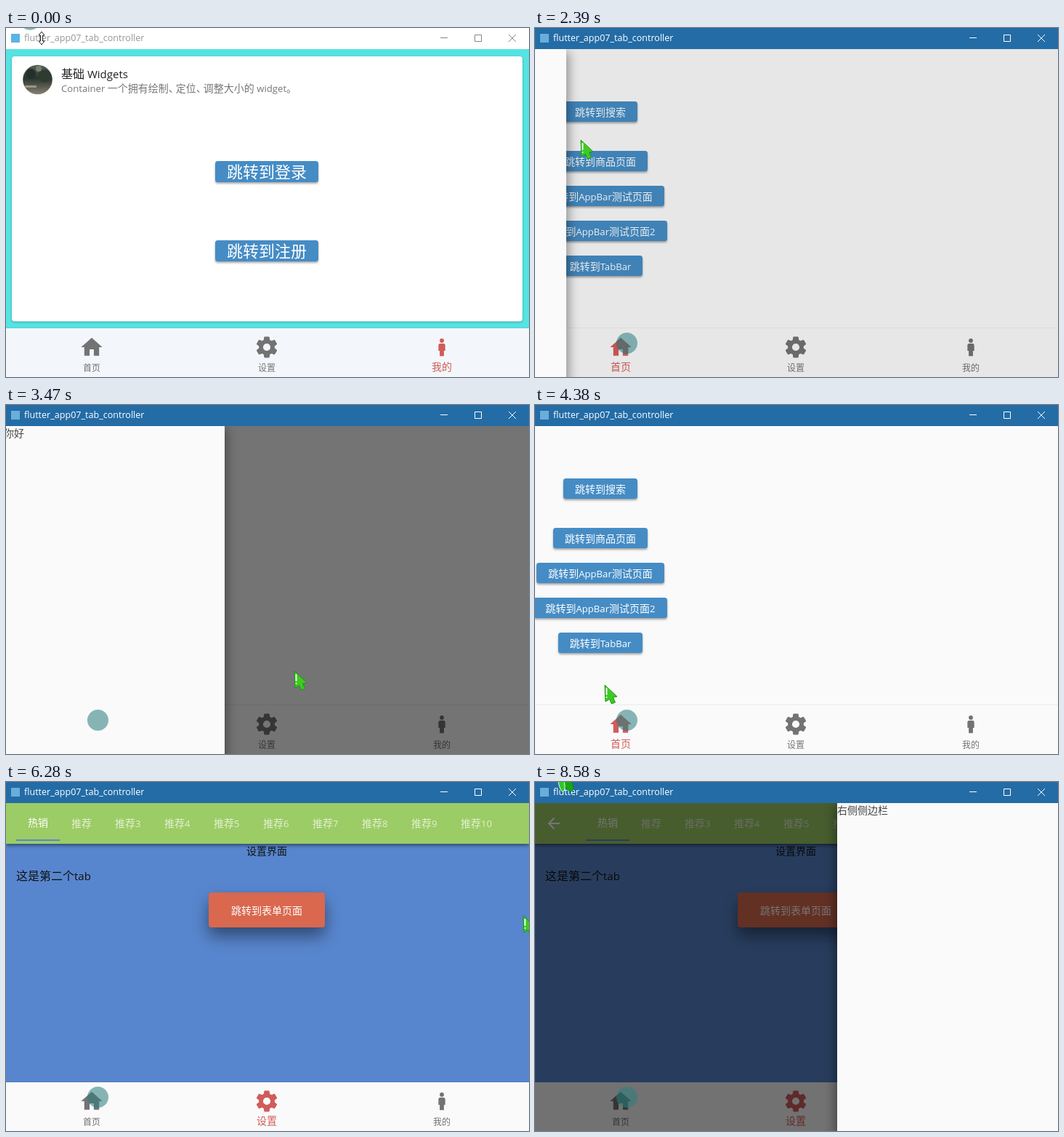
Recreate the animation shown at these times as an HTML page with a canvas. Size 720x480 px, loop 8.75 s.

```html
<!DOCTYPE html>
<html lang="zh">
<head>
<meta charset="utf-8">
<title>flutter_app07_tab_controller</title>
<style>
html, body { margin: 0; width: 100%; height: 100%; overflow: hidden; }
canvas { display: block; width: 720px; height: 480px; }
</style>
</head>
<body>
<canvas id="stage" width="720" height="480"></canvas>
<script>
const ctx = document.getElementById('stage').getContext('2d');
const LOOP = 8750;
const RED = [208, 92, 90], GREY = [115, 115, 115];

// The screen only refreshes at these moments.
const STEPS = [0, 220, 410, 600, 780, 960, 1160, 1320, 1490, 1660, 1830, 2390, 2560, 2730, 2900,
  3090, 3280, 3470, 3640, 3810, 4000, 4190, 4380, 4570, 4740, 4910, 5080, 5260, 5430, 5600,
  5770, 5940, 6110, 6280, 6640, 6830, 7000, 7360, 7890, 8070, 8240, 8410, 8580];
const POINTER = [[0, 49, 14], [220, 62, 90], [600, 118, 360], [780, 122, 428], [960, 119, 384],
  [1160, 100, 330], [1830, 3, 158], [2390, 63, 154], [3280, 400, 340], [3470, 397, 366],
  [4380, 96, 385], [4570, 110, 400], [5260, 362, 426], [5600, 362, 426], [6280, 712, 184],
  [6640, 628, 186], [6830, 414, 183], [7000, 398, 177], [7360, 220, 130], [7890, 150, 90], [8580, 30, -12]];
const LEFT = [[1830, 0], [2390, 43], [3090, 304], [3280, 304], [3470, 301], [4380, 0]];
const RIGHT = [[6280, 0], [6640, 80], [6830, 294], [7000, 304]];

const rgb = c => `rgb(${c.map(Math.round).join(',')})`;
const mix = (a, b, k) => a.map((v, i) => v + (b[i] - v) * k);

function valueAt(keys, t) {
  if (t <= keys[0][0]) return keys[0].slice(1);
  for (let i = 1; i < keys.length; i++) {
    const a = keys[i - 1], b = keys[i];
    if (t <= b[0]) return mix(a.slice(1), b.slice(1), (t - a[0]) / (b[0] - a[0]));
  }
  return keys[keys.length - 1].slice(1);
}

function box(x, y, w, h, color, r = 0) {
  ctx.fillStyle = color;
  ctx.beginPath();
  ctx.roundRect(x, y, w, h, r);
  ctx.fill();
}

function disc(x, y, r, color) {
  ctx.fillStyle = color;
  ctx.beginPath();
  ctx.arc(x, y, r, 0, 7);
  ctx.fill();
}

function withShadow(alpha, blur, dx, dy, draw) {
  ctx.save();
  ctx.shadowColor = `rgba(0,0,0,${alpha})`;
  ctx.shadowBlur = blur;
  ctx.shadowOffsetX = dx;
  ctx.shadowOffsetY = dy;
  draw();
  ctx.restore();
}

// Latin runs are set slightly smaller than the Chinese ones; y is the middle of the line.
function text(str, x, y, size, color, align = 'left') {
  const runs = str.match(/[\x20-\x7e]+|、|[^\x20-\x7e、]+/g).map(s => {
    const latin = /^[\x20-\x7e]/.test(s);
    const font = latin ? `${size * 0.938}px "Open Sans", "Noto Sans", sans-serif`
      : `${size}px "Noto Sans CJK SC", "Noto Sans CJK", sans-serif`;
    ctx.font = font;
    return { s, font, w: ctx.measureText(s).width * (s === '、' ? 0.72 : 1) };
  });
  if (align === 'center') x -= runs.reduce((sum, r) => sum + r.w, 0) / 2;
  ctx.fillStyle = color;
  for (const r of runs) {
    ctx.font = r.font;
    ctx.fillText(r.s, x, y + size * 0.38);
    x += r.w;
  }
}

function button(label, x, y, w, h = 28, size = 14) {
  withShadow(0.35, 3, 0, 2, () => box(x, y, w, h, '#458cc5', 3.5));
  text(label, x + w / 2, y + h / 2 + 0.5, size, '#fff', 'center');
}

const HOME = new Path2D('M10 20v-6h4v6h5v-8h3L12 3 2 12h3v8z');
const PERSON = new Path2D('M14 5.8a2 2 0 1 1-4 0a2 2 0 1 1 4 0zM10.4 8.6h3.2q1.6 0 1.6 1.8v5h-1.2v5h-4v-5h-1.2v-5q0-1.8 1.6-1.8z');
const GEAR = (() => {
  const p = new Path2D();
  const tooth = [[-2.87, -6.93], [-2.49, -9.58], [-2, -10], [2, -10], [2.49, -9.58], [2.87, -6.93]];
  for (let k = 0; k < 6; k++) {
    const c = Math.cos(k * Math.PI / 3), s = Math.sin(k * Math.PI / 3);
    for (const [x, y] of tooth) p.lineTo(12 + x * c - y * s, 12 + x * s + y * c);
  }
  p.closePath();
  p.moveTo(15.5, 12);
  p.arc(12, 12, 3.5, 0, Math.PI * 2);
  return p;
})();
const TABS = [['首页', HOME, 118], ['设置', GEAR, 359], ['我的', PERSON, 600]];

function icon(path, cx, color) {
  ctx.save();
  ctx.translate(cx - 17.5, 421.5);
  ctx.scale(35 / 24, 35 / 24);
  ctx.fillStyle = color;
  ctx.fill(path, 'evenodd');
  ctx.restore();
}

function navBar(t, page) {
  withShadow(0.16, 2, 0, -0.5, () => box(0, 413, 720, 67, page === 2 ? '#f3f7fb' : '#fafafa'));
  ctx.save();
  ctx.beginPath();
  ctx.rect(0, 413, 720, 67);
  ctx.clip();
  if (t >= 780 && t < 1160) disc(118, 448, t < 960 ? 20 : 35, 'rgba(0,0,0,.085)');
  if (t >= 5260 && t < 5600) disc(359, 447.5, 35, 'rgba(60,30,70,.05)');
  ctx.restore();
  const active = t < 1160 ? 2 : t < 5600 ? 0 : 1;
  const fading = (t >= 960 && t < 1160) || (t >= 5430 && t < 5600);
  TABS.forEach(([label, path, x], i) => {
    const on = i === active;
    const color = rgb(on ? mix(RED, GREY, fading ? 0.4 : 0) : GREY);
    icon(path, x, color);
    text(label, x, on ? 465.5 : 467.5, on ? 14 : 12, color, 'center');
  });
}

function avatar() {
  ctx.save();
  ctx.beginPath();
  ctx.arc(43.5, 71, 20.3, 0, 7);
  ctx.clip();
  const g = ctx.createLinearGradient(0, 50, 0, 92);
  g.addColorStop(0, '#59655a');
  g.addColorStop(0.45, '#2a352f');
  g.addColorStop(0.65, '#4b5045');
  g.addColorStop(1, '#8b8479');
  ctx.fillStyle = g;
  ctx.fillRect(23, 50, 42, 42);
  disc(34, 63, 7, '#25302b');
  disc(53, 66, 9, '#303b30');
  disc(45, 56, 4, '#788172');
  box(26, 79, 16, 3, '#9c9789', 1);
  ctx.restore();
}

function minePage() {
  box(0, 29, 720, 384, '#56e3e2');
  withShadow(0.3, 3, 0, 1, () => box(8, 39, 703, 364.5, '#fff', 4));
  avatar();
  text('基础 Widgets', 76, 63, 16, '#222');
  text('Container 一个拥有绘制、定位、调整大小的 widget。', 76, 83, 14, '#777');
  button('跳转到登录', 288, 183, 142, 29, 22);
  button('跳转到注册', 288, 292, 142, 29, 22);
}

function homePage() {
  box(0, 29, 720, 384, '#fafafa');
  button('跳转到搜索', 39, 101, 102);
  button('跳转到商品页面', 25, 169, 130);
  button('跳转到AppBar测试页面', 2, 217, 176);
  button('跳转到AppBar测试页面2', -2, 265, 184);
  button('跳转到TabBar', 32, 313, 116);
}

function settingsPage(t) {
  box(0, 29, 720, 384, '#5886ce');
  withShadow(0.5, 5, 0, 2, () => box(0, 29, 720, 56, '#9ccc65'));
  const back = t >= 7360;
  let x = back ? 70 : 14;
  if (back) {
    ctx.strokeStyle = '#fff';
    ctx.lineWidth = 2.2;
    ctx.beginPath();
    ctx.moveTo(34, 57);
    ctx.lineTo(20, 57);
    ctx.moveTo(26.5, 49.5);
    ctx.lineTo(19, 57);
    ctx.lineTo(26.5, 64.5);
    ctx.stroke();
  }
  box(x, 79, 60, 2, '#5886ce');
  for (let i = 1; i <= 10; i++) {
    const label = i === 1 ? '热销' : i === 2 ? '推荐' : '推荐' + i;
    text(label, x + 16, i === 1 ? 56 : 57, 14, i === 1 ? '#fff' : 'rgba(255,255,255,.7)');
    x += i < 3 ? 60 : 68;
  }
  text('设置界面', 359, 95, 14, '#111', 'center');
  text('这是第二个tab', 14, 128.5, 16, '#111');
  withShadow(0.45, 22, 0, 12, () => box(279, 152, 160, 48, '#d9684e', 4));
  text('跳转到表单页面', 359, 176.5, 14, '#fff', 'center');
}

function drawers(left, right) {
  const open = Math.max(left, right);
  if (open <= 0) return;
  ctx.save();
  ctx.beginPath();
  ctx.rect(0, 29, 720, 451);
  ctx.clip();
  box(0, 29, 720, 451, `rgba(0,0,0,${0.54 * open / 304})`);
  const x = left > 0 ? left - 304 : 720 - right;
  withShadow(0.4, 14, left > 0 ? 3 : -3, 4, () => box(x, 29, 304, 460, '#fafafa'));
  text(left > 0 ? '你好' : '右侧侧边栏', x, 39, 14, '#444');
  ctx.restore();
}

function titleBar(active) {
  box(0, 0, 720, 29, active ? '#236ca6' : '#fff');
  box(7, 8, 12, 12, active ? '#6badda' : '#5ab4e4');
  text('flutter_app07_tab_controller', 25, 13.4, 13.4, active ? '#fff' : '#969696');
  ctx.strokeStyle = active ? '#fff' : '#858585';
  ctx.lineWidth = 1;
  ctx.beginPath();
  ctx.moveTo(598, 13.5);
  ctx.lineTo(608, 13.5);
  ctx.rect(645.5, 9.5, 9, 9);
  ctx.moveTo(692, 9);
  ctx.lineTo(702, 19);
  ctx.moveTo(702, 9);
  ctx.lineTo(692, 19);
  ctx.stroke();
}

function clickMark(t, page, left) {
  const x = t < 780 ? 33 : 126.5, y = t < 780 ? -11.5 : 433.5;
  disc(x, y, 14.5, 'rgba(45,126,126,.57)');
  if (page !== 0 || t < 1160) return;
  // The part of the home icon under the mark keeps its idle colour.
  ctx.save();
  ctx.beginPath();
  ctx.rect(left, 413, 720, 67);
  ctx.clip();
  ctx.beginPath();
  ctx.arc(x, y, 14.5, 0, 7);
  ctx.clip();
  icon(HOME, 118, rgb(mix([108, 114, 114], [0, 0, 0], 0.54 * left / 304)));
  ctx.restore();
}

const ARROW = new Path2D('M0 0L17 16L11.5 17L14.5 24L9.5 26L6.5 19.5L1 23Z');
const RESIZE = new Path2D('M0-9L4-4H1.5V4H4L0 9L-4 4H-1.5V-4H-4Z');

function leaf(x, y, rx, ry, turn, fill, edge) {
  ctx.beginPath();
  ctx.ellipse(x, y, rx, ry, turn, 0, 7);
  ctx.fillStyle = fill;
  ctx.fill();
  ctx.strokeStyle = edge;
  ctx.stroke();
}

function pointer(t) {
  const [x, y] = valueAt(POINTER, t);
  ctx.save();
  ctx.translate(x, y);
  ctx.lineJoin = 'round';
  ctx.lineWidth = 1;
  if (t < 220) {
    ctx.fillStyle = '#fff';
    ctx.strokeStyle = '#222';
    ctx.fill(RESIZE);
    ctx.stroke(RESIZE);
  } else if (t === 780 || (t >= 5260 && t < 5770) || t >= 8580) {
    leaf(15, 14, 5.5, 12, -0.5, '#16a814', '#0d8a10');
    leaf(6.5, 13.5, 4, 12, -0.2, '#2fc826', '#e8ffe4');
  } else {
    ctx.fillStyle = '#3ecb22';
    ctx.strokeStyle = '#1f9414';
    ctx.fill(ARROW);
    ctx.stroke(ARROW);
    box(1.5, 4, 2, 10, '#f2fff0', 1);
    box(1.5, 16, 2, 2, '#f2fff0', 1);
  }
  ctx.restore();
}

function draw(now) {
  const time = now % LOOP;
  const t = STEPS.filter(s => s <= time).pop();
  const page = t < 960 ? 2 : t < 5430 ? 0 : 1;
  const [left] = valueAt(LEFT, t), [right] = valueAt(RIGHT, t);
  ctx.clearRect(0, 0, 720, 480);
  [homePage, settingsPage, minePage][page](t);
  navBar(t, page);
  drawers(left, right);
  titleBar(t >= 780);
  clickMark(t, page, left);
  pointer(t);
}

const start = performance.now();
function tick() {
  draw(performance.now() - start);
  requestAnimationFrame(tick);
}
tick();
</script>
</body>
</html>
```
